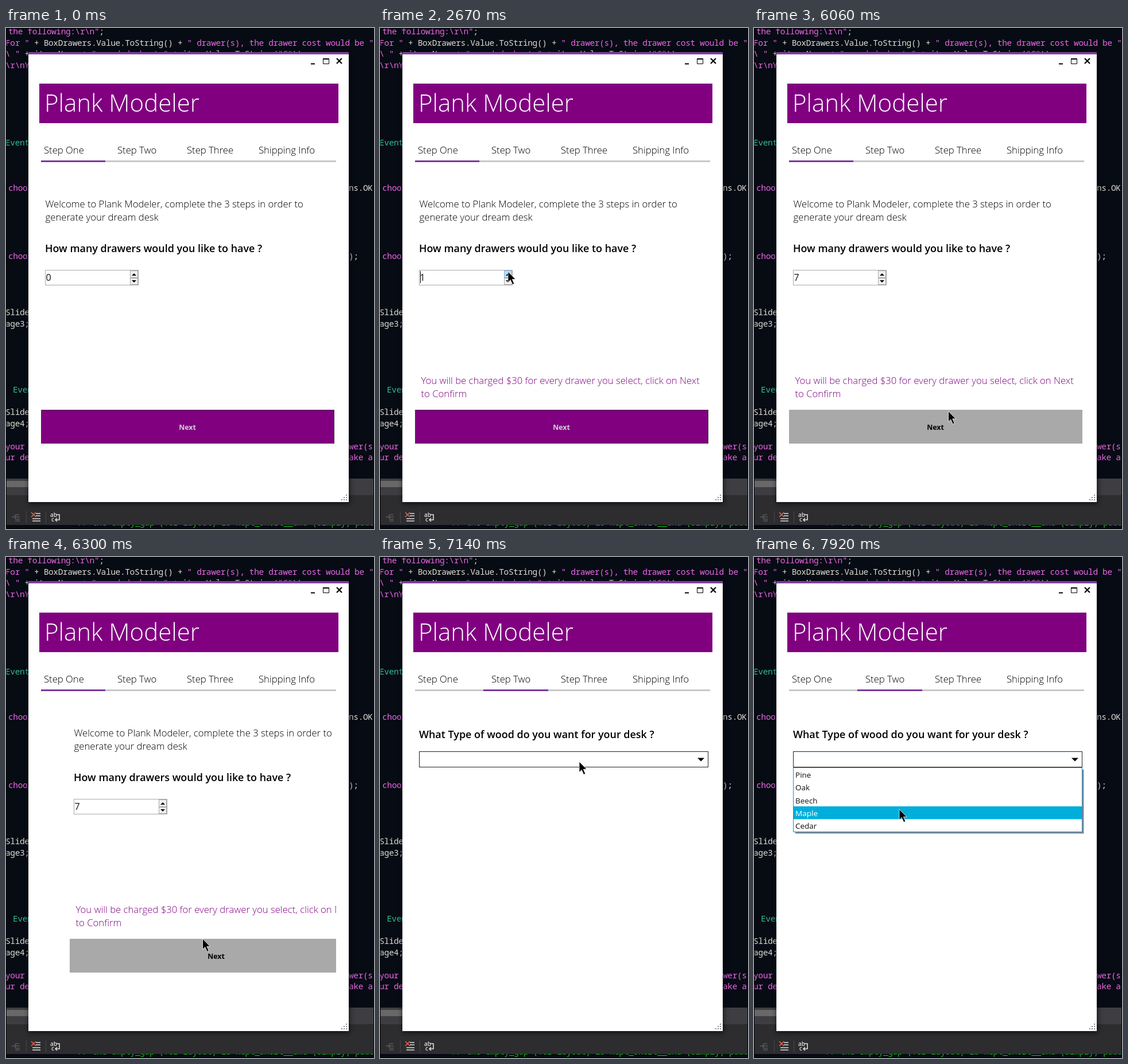
Write an HTML page that moves like this. It is 641 by 874 pixels and loops after 8000 ms.

```html
<!DOCTYPE html>
<html lang="en">
<head>
<meta charset="utf-8">
<title>Desk order form</title>
<style>
html, body { margin: 0; width: 100%; height: 100%; overflow: hidden; background: #070b14; }
svg { display: block; width: 641px; height: 874px; }
text { font-family: "Open Sans", "Noto Sans", sans-serif; white-space: pre; }
.code text { font: 14.5px "Noto Sans Mono", "DejaVu Sans Mono", monospace; letter-spacing: -.37px; fill: #dcdcd2; }
.code .p { fill: #ea66e6; }
.code .t { fill: #2fbf94; }
.code .g { fill: #18c018; }
.light { font-size: 16.7px; font-weight: 330; fill: #000; }
.semi { font-size: 17.95px; font-weight: 600; fill: #000; }
.note { fill: #800080; }
.item { font-size: 13.5px; fill: #111; }
</style>
</head>
<body>
<svg viewBox="0 0 641 874">
  <defs>
    <clipPath id="pane"><rect x="61" y="240" width="514" height="500"/></clipPath>
    <clipPath id="foot"><rect y="867" width="641" height="7"/></clipPath>
    <filter id="blur" x="-10%" y="-10%" width="120%" height="120%"><feGaussianBlur stdDeviation="4"/></filter>
  </defs>

  <rect width="641" height="874" fill="#070b14"/>
  <g class="code" id="code"></g>
  <rect y="786" width="641" height="29" fill="#3e3e42"/>
  <rect y="790" width="200" height="11" fill="#686868"/>
  <rect y="815" width="641" height="52" fill="#2d2d30"/>
  <g class="code" clip-path="url(#foot)"><text class="g" x="125" y="868">// the empty_gap (for layout) is kept_short__and (simply) padded_by</text></g>

  <g fill="none" stroke-width="1.6">
    <path d="M10 853h8m-3-3l3 3-3 3M16 849h7M19 853h5M16 857h8M16 860h8" stroke="#58585a"/>
    <path d="M35.5 843v21M69.5 843v21" stroke="#46464a" stroke-width="1"/>
    <path d="M52 847h8M52 851h8M46 856h14M46 860h14" stroke="#ddd"/>
    <path d="M44 845l8 8M52 845l-8 8" stroke="#e0674a"/>
    <path d="M88 849h5v9h-7m3-3l-3 3 3 3" stroke="#ddd"/>
  </g>
  <g fill="#ddd" font-size="10" font-weight="600"><text x="77" y="853">ab</text><text x="79" y="861">c</text></g>

  <rect x="39" y="44" width="560" height="786" fill="#000" opacity=".6" filter="url(#blur)"/>
  <rect x="39" y="42" width="558" height="785" fill="#fff"/>
  <rect x="39" y="42" width="558" height="4" fill="#7c3f9b"/>
  <path d="M531 62.5h7" stroke="#000" stroke-width="2"/>
  <path d="M552.5 54v8.5h10V54" fill="none" stroke="#000"/>
  <path d="M552 54h11" stroke="#000" stroke-width="2"/>
  <path d="M576 53l9 9M585 53l-9 9" stroke="#000" stroke-width="2.2"/>
  <g id="grip" fill="#888"></g>

  <rect x="58" y="97" width="521" height="69" fill="#800080"/>
  <text x="67" y="146" font-size="42" font-weight="300" fill="#fff">Plank Modeler</text>

  <g class="light">
    <text x="66" y="219">Step One</text>
    <text x="194" y="219">Step Two</text>
    <text x="315" y="219">Step Three</text>
    <text x="440" y="219">Shipping Info</text>
  </g>
  <rect x="61" y="231" width="514" height="3" fill="#c8c8c8"/>
  <rect id="tab" y="231" height="3" fill="#7a38a0"/>

  <g clip-path="url(#pane)">
    <g id="page1">
      <text class="light" x="68.5" y="313">Welcome to Plank Modeler, complete the 3 steps in order to</text>
      <text class="light" x="68.5" y="336">generate your dream desk</text>
      <text class="semi" x="68" y="391">How many drawers would you like to have ?</text>
      <rect x="68.5" y="422.5" width="162" height="26" fill="#fff" stroke="#aaa"/>
      <text id="count" x="69.5" y="441" font-size="16" fill="#111"></text>
      <path id="caret" d="M70.5 424v21" stroke="#000"/>
      <rect id="up" x="216.5" y="423.5" width="13" height="12"/>
      <rect x="216.5" y="436.5" width="13" height="11" fill="#f0f0f0" stroke="#aaa"/>
      <path d="M219 432h8l-4-4zM219 440h8l-4 4z"/>
      <g id="note" class="light">
        <text class="note" x="71.5" y="621">You will be charged $30 for every drawer you select, click on Next</text>
        <text class="note" x="71.5" y="644">to Confirm</text>
      </g>
      <rect id="next" x="61.5" y="666.5" width="510" height="58"/>
      <text id="nextText" x="316" y="701" font-size="12.4" font-weight="700" text-anchor="middle">Next</text>
    </g>
  </g>

  <g id="page2">
    <text class="semi" x="68" y="316">What Type of wood do you want for your desk ?</text>
    <rect x="68.5" y="339.5" width="503" height="27" fill="#fff" stroke="#222"/>
    <path d="M553 350.5h12l-6 6z"/>
    <g id="list">
      <rect x="72" y="371" width="503" height="112" fill="#7f8a92" opacity=".5"/>
      <rect x="72" y="371" width="502" height="111" fill="#7f8a92"/>
      <rect x="68.5" y="367.5" width="503" height="112" fill="#fff" stroke="#2a86c8"/>
      <rect id="pick" x="69" width="502" height="22.4" fill="#00aedb"/>
      <g id="items"></g>
    </g>
  </g>

  <path id="cursor" d="M0 0v18.5l4.2-4 3.6 8 3-1.3-3.5-7.9h5.7z" fill="#000" stroke="#fff" stroke-width=".8"/>
  <rect x=".5" y=".5" width="640" height="873" fill="none" stroke="#000"/>
</svg>
<script>
const LOOP = 8000, STEP = 30, ROW = 22.4, LIST_TOP = 367.8;
const CLICKS = [2670, 3120, 3600, 3990, 4410, 4830, 5250];
const SLIDE = 6250, SWAP = 6764, OPEN = 7230;
const WOODS = ['Pine', 'Oak', 'Beech', 'Maple', 'Cedar'];

// time, x, y of the pointer tip
const PATH = [
  [300, 616, 57], [480, 530, 190], [690, 385, 385], [900, 295, 437], [1080, 249, 434],
  [1320, 233, 430], [1530, 233, 430], [1830, 223, 425], [5520, 223, 425], [5700, 245, 480],
  [6000, 336, 665], [6120, 341, 672], [6300, 342.5, 666], [6420, 343, 650],
  [6840, 347, 440], [7140, 347, 357], [7230, 347, 358], [7440, 325, 375], [7920, 253, 440]
];

const $ = id => document.getElementById(id);
const show = (id, on) => $(id).setAttribute('visibility', on ? 'inherit' : 'hidden');
const set = (id, attrs) => { for (const k in attrs) $(id).setAttribute(k, attrs[k]); };

// {p:…} marks strings, {t:…} marks types
const CODE = [
  [4, 11, '{p:the following:\\r\\n"};'],
  [-1, 31, '{p:For "} + BoxDrawers.Value.ToString() + {p:" drawer(s), the drawer cost would be "}'],
  [-1, 50, '{p:\\ "} + item.Name + {p:" wood desk at "} + item.Value.ToString({p:"C"}))'],
  [-1, 70, '{p:\\r\\nYour}'],
  [-1, 205, '{t:EventArgs}'],
  [4, 284, '{p:choose}'], [597, 284, 'ns.OK'],
  [4, 403, '{p:choose}'], [597, 403, ');'],
  [-1, 501, 'Slider'], [-1, 521, 'age3;'],
  [12, 636, '{t:Event}'],
  [-1, 675, 'Slider'], [-1, 695, 'age4;'],
  [-1, 735, '{p:your}'], [597, 735, '{p:wer(s}'],
  [-1, 754, '{p:ur desk}'], [597, 754, '{p:ake a}']
];
$('code').innerHTML = CODE.map(([x, y, s]) =>
  `<text x="${x}" y="${y}">${s.replace(/\{(\w):([^}]*)\}/g, '<tspan class="$1">$2</tspan>')}</text>`).join('');

let dots = '';
for (let r = 0; r < 3; r++)
  for (let c = 0; c <= r; c++)
    dots += `<rect x="${592 - c * 4}" y="${814 + r * 4}" width="2" height="2"/>`;
$('grip').innerHTML = dots;

$('items').innerHTML = WOODS.map((w, i) =>
  `<text class="item" x="72" y="${384.8 + i * ROW}">${w}</text>`).join('');

function pointer(t) {
  const i = PATH.findIndex(p => p[0] > t);
  if (i < 0) return PATH[PATH.length - 1].slice(1);
  if (!i) return PATH[0].slice(1);
  const [t0, x0, y0] = PATH[i - 1], [t1, x1, y1] = PATH[i];
  const k = (t - t0) / (t1 - t0);
  return [x0 + (x1 - x0) * k, y0 + (y1 - y0) * k];
}

function draw(time) {
  const t = Math.floor(time / STEP) * STEP;
  const [x, y] = pointer(t);
  const second = t >= SWAP;

  show('cursor', t >= 300);
  set('cursor', { transform: `translate(${x} ${y})` });
  set('tab', second ? { x: 180, width: 113 } : { x: 61, width: 112 });

  show('page1', !second);
  set('page1', { transform: `translate(${Math.max(0, t - SLIDE)} 0)` });
  const count = CLICKS.filter(c => c <= t).length;
  $('count').textContent = count;
  show('caret', count && t < 6000);
  show('note', count);
  const over = t > 1500 && x < 230 && y < 436;
  const down = CLICKS.some(c => t >= c && t < c + 60);
  set('up', { fill: down ? '#b8dcf6' : over ? '#d4e9fa' : '#f0f0f0', stroke: over ? '#7eb4ea' : '#aaa' });
  const hot = t >= 6000;
  set('next', { fill: hot ? '#a9a9a9' : '#800080', stroke: hot ? '#a9a9a9' : '#4a2a4a' });
  set('nextText', { fill: hot ? '#000' : '#d3d3d3' });

  show('page2', second);
  show('list', t >= OPEN);
  const row = Math.floor((y - LIST_TOP) / ROW);
  show('pick', row >= 0);
  set('pick', { y: LIST_TOP + Math.max(0, row) * ROW });
  [...$('items').children].forEach((e, i) => { e.style.fill = i === row ? '#fff' : '#111'; });
}

const start = performance.now();
function tick() {
  draw((performance.now() - start) % LOOP);
  requestAnimationFrame(tick);
}
tick();
</script>
</body>
</html>
```
